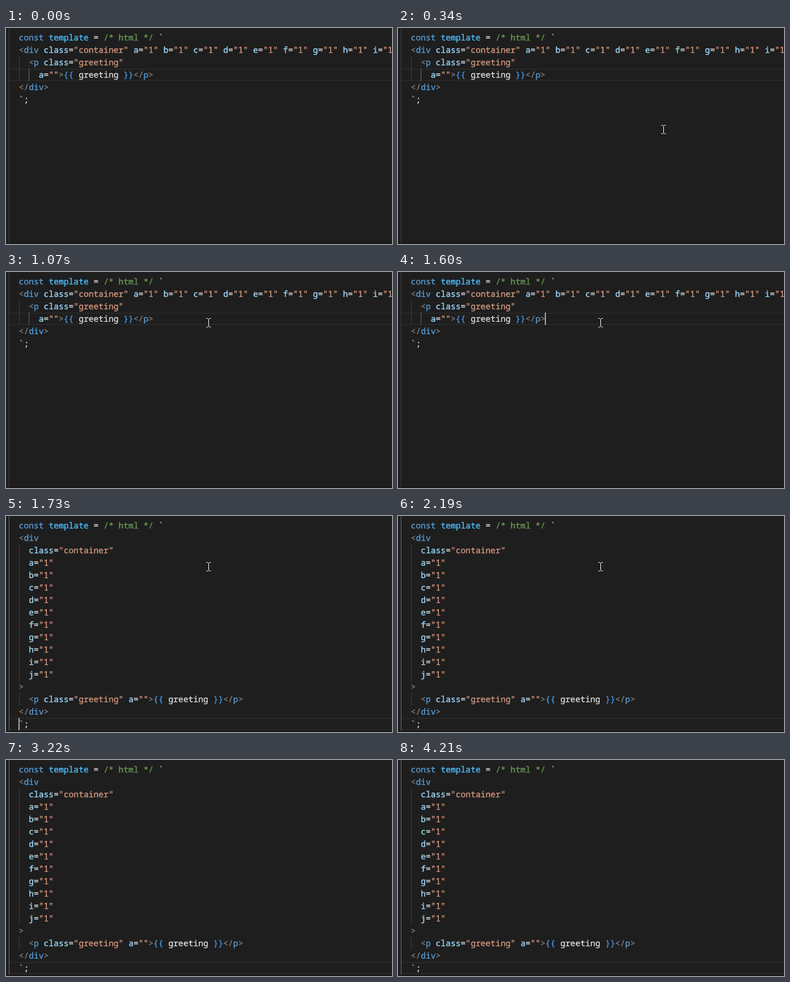
Write an HTML page that moves like this. It is 681 by 383 pixels and loops after 4.43 s.

```html
<!DOCTYPE html>
<html lang="en">
<head>
<meta charset="utf-8">
<title>Template formatting</title>
<style>
  html, body { margin: 0; width: 100%; height: 100%; overflow: hidden; background: #1e1e1e; }
  svg { display: block; width: 681px; height: 383px; }
  text {
    font: 14.66px "Noto Sans Mono", "DejaVu Sans Mono", monospace;
    text-rendering: geometricPrecision;
    white-space: pre;
    stroke-width: .35px;
  }
</style>
</head>
<body>
<svg id="stage" viewBox="0 0 681 383"></svg>
<script>
const LOOP = 4430, CHAR = 8.797, ROW = 22, LEFT = 22.6, TOP = 6;
const GUIDE = '#404040', ACTIVE = '#707070';

const RULES = [
  [/\/\*.*?\*\//, '#6a9955'],
  [/"[^"]*"|`/, '#d7997f'],
  [/const\b/, '#569cd6'],
  [/template\b/, '#4fc1ff'],
  [/<\/?|>/, '#808080'],
  [/(?<=<\/?)\w+/, '#569cd6'],
  [/\w+(?==)/, '#9cdcfe'],
  [/\{\{|\}\}/, '#4598ea'],
  [/\w+|\S/, '#dedede'],
];
const LEXER = new RegExp(RULES.map(([r]) => `(${r.source})`).join('|'), 'g');

const letters = [...'abcdefghij'];
const head = 'const template = /* html */ `';
const before = [
  head,
  `<div class="container" ${letters.map(c => c + '="1"').join(' ')}>`,
  '  <p class="greeting"',
  '    a="">{{ greeting }}</p>',
  '</div>',
  '`;',
];
const after = [
  head,
  '<div',
  '  class="container"',
  ...letters.map(c => `  ${c}="1"`),
  '>',
  '  <p class="greeting" a="">{{ greeting }}</p>',
  '</div>',
  '`;',
];

const stage = document.getElementById('stage');

function add(parent, tag, attrs, content) {
  const el = document.createElementNS('http://www.w3.org/2000/svg', tag);
  for (const key in attrs) el.setAttribute(key, attrs[key]);
  if (content) el.textContent = content;
  return parent.appendChild(el);
}

const box = (parent, x, y, width, height, fill) =>
  add(parent, 'rect', { x, y, width, height, fill });

// guides: [x, first row, row count, colour]
function page(lines, current, guides) {
  const g = add(stage, 'g', {});
  const y = TOP + current * ROW;
  box(g, 5, y, 676, 2, '#282828');
  box(g, 5, y + ROW - 2, 676, 2, '#282828');
  for (const [x, row, count, fill] of guides)
    box(g, x, TOP + row * ROW, 1, count * ROW, fill);
  lines.forEach((line, i) => {
    for (const m of line.matchAll(LEXER)) {
      const colour = RULES[m.slice(1).findIndex(s => s !== undefined)][1];
      add(g, 'text', {
        x: LEFT + m.index * CHAR,
        y: TOP + i * ROW + 16,
        fill: colour,
        stroke: colour,
      }, m[0]);
    }
  });
  return g;
}

const pages = [
  page(before, 3, [[5, -1, 19, GUIDE], [23, 2, 2, GUIDE], [40, 3, 1, ACTIVE]]),
  page(after, 16, [[5, -1, 19, ACTIVE], [23, 2, 11, GUIDE], [23, 14, 1, GUIDE]]),
];
box(stage, 0, 381, 681, 2, '#1a1617');

const caret = box(stage, 0, 0, 2, ROW, '#aeafad');
const click = add(stage, 'circle', { cx: 355, cy: 89, r: 12, fill: '#9d940e' });
const mouse = add(stage, 'path', {
  d: 'M-3.5 -7.5H-.5M1.5 -7.5H4.5M.5 -7V7M-3.5 7.5H-.5M1.5 7.5H4.5',
  stroke: '#fff', fill: 'none',
});

// [time, x, y]; no place means the pointer is outside
const path = [
  [0], [130, 623, 353], [212, 560, 272], [294, 468, 180], [376, 398, 118],
  [458, 364, 95], [540, 357, 90], [2720, 410, 132], [2790, 525, 252],
  [2860, 583, 330], [2930, 596, 364], [3000],
];
const blinks = [540, 1070, 1600, 2190, 2720, 3220, 3690, 4210];

const show = (el, on) => el.setAttribute('visibility', on ? 'visible' : 'hidden');

function draw(t) {
  const done = t >= 1730;
  show(pages[0], !done);
  show(pages[1], done);

  caret.setAttribute('x', done ? 22 : 259);
  caret.setAttribute('y', done ? 358 : 72);
  show(caret, blinks.filter(b => b <= t).length % 2);

  const [, x, y] = path.findLast(p => p[0] <= t);
  show(mouse, x !== undefined);
  if (x !== undefined) mouse.setAttribute('transform', `translate(${x} ${y})`);
  show(click, t >= 540 && t < 680);
}

const start = performance.now();
function tick() {
  draw((performance.now() - start) % LOOP);
  requestAnimationFrame(tick);
}
tick();
</script>
</body>
</html>
```
